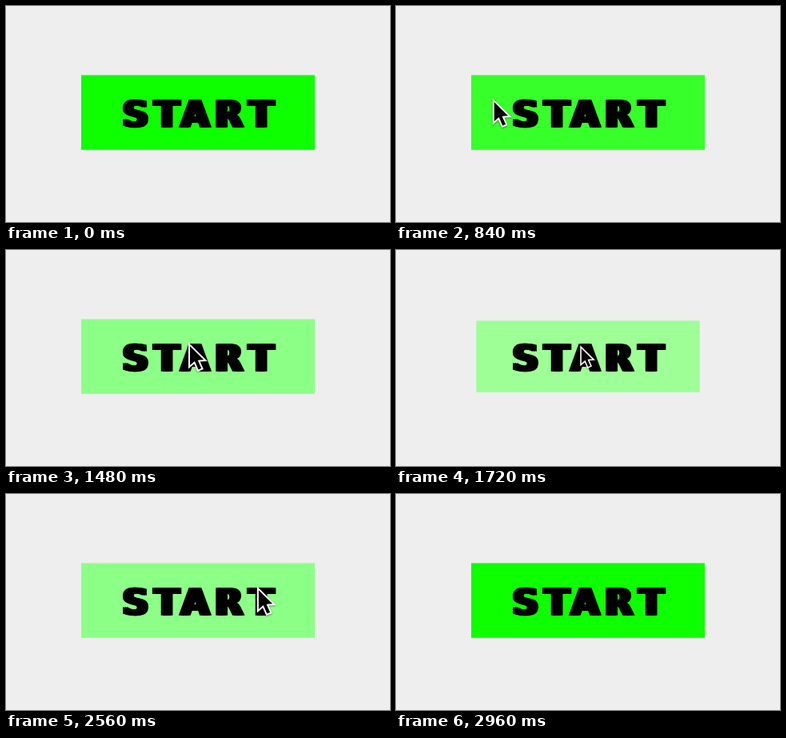
An HTML page for the animation above (3200 ms loop, 480 by 270 pixels).

```html
<!DOCTYPE html>
<html lang="en">
<head>
<meta charset="utf-8">
<title>Start button</title>
<style>
  html, body { margin: 0; width: 100%; height: 100%; overflow: hidden; background: #eee; }
  svg { display: block; width: 100vw; height: 100vh; }
  /* Sideways shadows thicken the stems into a wide, heavy face. */
  text {
    font: bold 45px "DejaVu Sans", sans-serif; text-anchor: middle;
    stroke: #000; stroke-width: 1.3;
    filter: drop-shadow(2.2px 0 0 #000) drop-shadow(-2.2px 0 0 #000);
  }
  #cursor { filter: drop-shadow(0 1.5px 1.2px rgba(0, 0, 0, .4)); }
</style>
</head>
<body>
<svg viewBox="0 0 480 270">
  <rect id="button" x="-146" y="-46.7" width="292" height="93.4"/>
  <text x="162.5 201.5 237 279 319.5" y="151.3">START</text>
  <g id="cursor">
    <path d="M0 0V28.5L6.5 22.8L11 33L16.5 30.6L12.2 20.8L20.5 20.3Z"
          stroke="#fff" stroke-width="2" stroke-linejoin="miter"/>
  </g>
</svg>
<script>
const LOOP = 3200;
const REST_X = 229, TIP_Y = 117.8;
const PIVOT = { x: 9.5, y: 15.5 };
const IDLE = [14, 255, 0], HOVER = [140, 255, 135], PRESSED = [158, 255, 150];

const button = document.getElementById('button');
const cursor = document.getElementById('cursor');

const progress = (t, from, to) => Math.min(1, Math.max(0, (t - from) / (to - from)));
const smooth = p => p * p * (3 - 2 * p);
const smoother = p => p * p * p * (10 - 15 * p + 6 * p * p);
const pulse = (t, a, b, c, d) => smooth(progress(t, a, b)) - smooth(progress(t, c, d));
const mix = (a, b, p) => a + (b - a) * p;
const mixColor = (a, b, p) => a.map((v, i) => mix(v, b[i], p));

function draw(t) {
  const hover = pulse(t, 770, 960, 2690, 2880);
  const press = pulse(t, 1560, 1740, 1840, 2080);

  const color = mixColor(mixColor(IDLE, HOVER, hover), PRESSED, press);
  button.setAttribute('fill', `rgb(${color.map(Math.round)})`);
  button.setAttribute('transform', `translate(240 133.1) scale(${mix(1, .955, press)})`);

  const x = REST_X - 304 * (1 - smoother(progress(t, 0, 1450)))
                   + 340 * smooth(progress(t, 2200, 3300));
  cursor.setAttribute('transform',
    `translate(${x + PIVOT.x} ${TIP_Y + PIVOT.y}) scale(${mix(1, .78, press)}) translate(${-PIVOT.x} ${-PIVOT.y})`);
  cursor.setAttribute('visibility', t >= 480 && t < 2960 ? 'visible' : 'hidden');
}

function tick() {
  draw(performance.now() % LOOP);
  requestAnimationFrame(tick);
}
tick();
</script>
</body>
</html>
```
